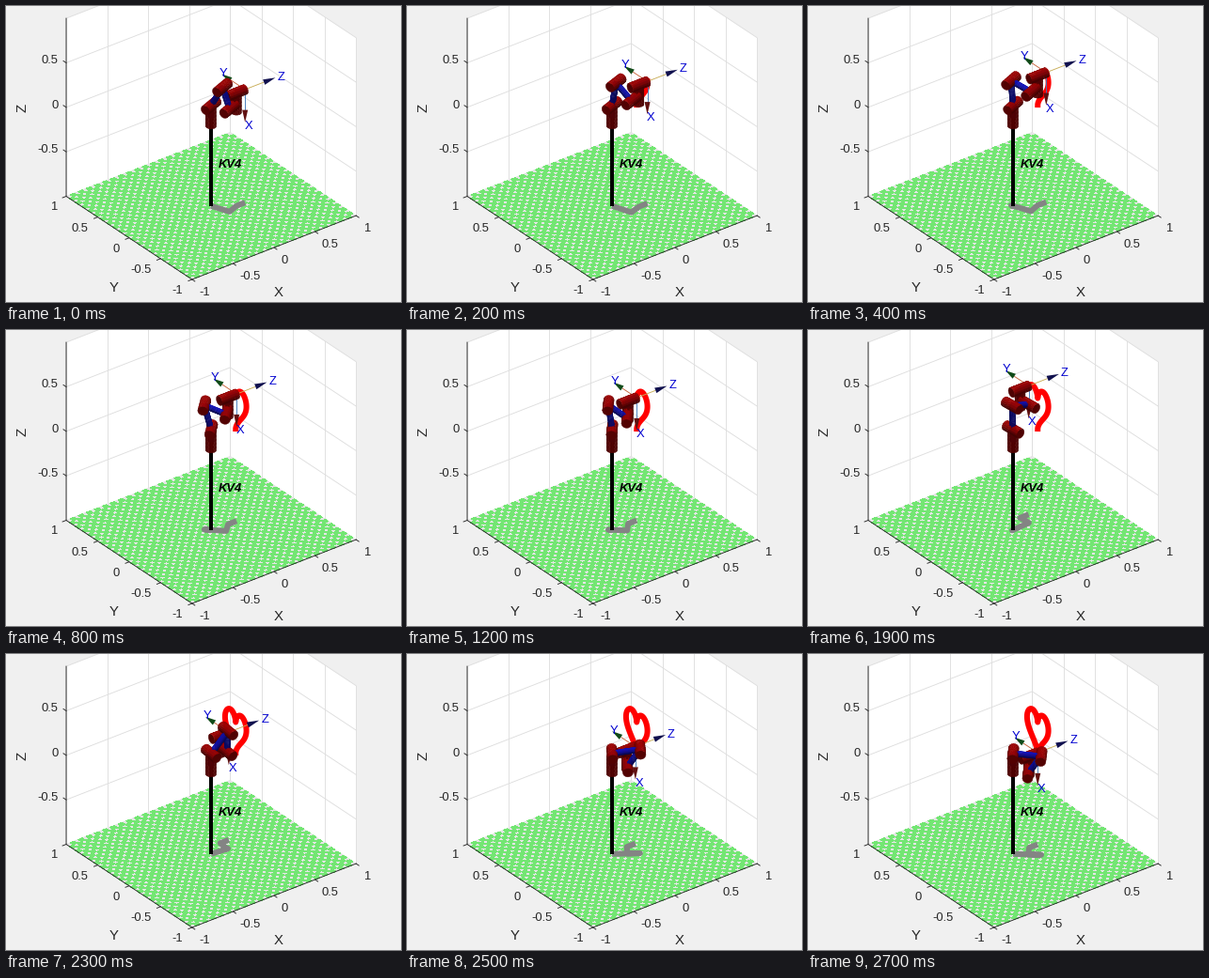
Animation of 420 by 315 pixels, one loop 2800 ms. Source, as a matplotlib script:

```python
import numpy as np
import matplotlib.pyplot as plt
from matplotlib.animation import FuncAnimation
from matplotlib.collections import LineCollection, PolyCollection

W, H, DPI = 420, 315, 100
PX = 72 / DPI
FRAMES, STEP_MS = 28, 100

# Orthographic camera
AZ, EL, SCALE = np.radians(37.5), np.radians(30.5), 109.9
RIGHT = np.array([np.cos(AZ), -np.sin(AZ), 0])
UP = np.array([np.sin(EL) * np.sin(AZ), np.sin(EL) * np.cos(AZ), np.cos(EL)])
VIEW = np.cross(RIGHT, UP)
CENTER = np.array([218.1, 118.1])

# Arm dimensions
D1, A2, A3, D4, D5, D6 = 0.1283, 0.274, 0.230, 0.1283, 0.116, 0.105
JOINT_R, JOINT_LEN, LINK_R = 0.05, 0.21, 0.028
RED, BLUE = np.array([0.7, 0.02, 0.02]), np.array([0.08, 0.08, 0.85])
LIGHT = np.array([-0.12, -0.12, 1])
LIGHT = LIGHT / np.linalg.norm(LIGHT)

XH, YH, ZH = np.eye(3)
AXIS_LEN, CONE_LEN = 0.37, 0.14


def project(p):
    p = np.asarray(p, float)
    return CENTER + SCALE * np.stack([p @ RIGHT, -(p @ UP)], axis=-1)


def unit(v):
    return v / np.linalg.norm(v)


def heart(deg):
    t = np.radians(deg)
    u = 16 * np.sin(t) ** 3
    v = 13 * np.cos(t) - 5 * np.cos(2 * t) - 2 * np.cos(3 * t) - np.cos(4 * t)
    return np.stack([np.full_like(t, 0.3), -0.0106 * u, 0.03 + 0.0156 * (v + 17)], axis=-1)


def heart_angle(i):
    return np.interp(i, [0, 4, 8, 12, 19, 23, 27], [107, 68, 26, -7, -71, -120, -180])


def solve_arm(tool):
    """Skeleton points and the joint axis normal for a tool facing +x."""
    wrist = tool - D6 * XH
    r = np.sqrt(wrist[0] ** 2 + wrist[1] ** 2 - D4 ** 2)
    yaw = np.arctan2(wrist[1], wrist[0]) - np.arctan2(D4, r)
    heading = np.array([np.cos(yaw), np.sin(yaw), 0])
    normal = np.array([-np.sin(yaw), np.cos(yaw), 0])
    dz = wrist[2] - D5 - D1
    dist = np.hypot(r, dz)
    bend = np.arccos(np.clip((dist ** 2 + A2 ** 2 - A3 ** 2) / (2 * dist * A2), -1, 1))
    pitch = np.arctan2(dz, r) + bend
    base = np.zeros(3)
    shoulder = D1 * ZH
    elbow = shoulder + A2 * (np.cos(pitch) * heading + np.sin(pitch) * ZH)
    mid = shoulder + r * heading + dz * ZH
    return [base, shoulder, elbow, mid, mid + D4 * normal, wrist, tool], normal


def shade(color, n):
    return color * (0.38 + 0.5 * max(0, n @ LIGHT))


def cylinder(a, b, radius, color, sides=16, parts=5):
    """Visible facets as (depth, polygon, color)."""
    axis = unit(b - a)
    side = unit(np.cross(axis, XH if abs(axis[0]) < 0.8 else YH))
    other = np.cross(axis, side)
    ang = np.linspace(0, 2 * np.pi, sides + 1)
    ring = np.cos(ang)[:, None] * side + np.sin(ang)[:, None] * other
    facets = []
    for k in range(sides):
        n = unit(ring[k] + ring[k + 1])
        if n @ VIEW <= 0:
            continue
        tone = shade(color, n)
        for j in range(parts):
            p, q = a + (b - a) * j / parts, a + (b - a) * (j + 1) / parts
            quad = np.array([p + radius * ring[k], q + radius * ring[k],
                             q + radius * ring[k + 1], p + radius * ring[k + 1]])
            facets.append((quad.mean(0) @ VIEW, project(quad), tone))
    end, n = (b, axis) if axis @ VIEW > 0 else (a, -axis)
    facets.append((end @ VIEW, project(end + radius * ring[:-1]), shade(color, n)))
    return facets


def arm_facets(points, normal):
    facets = []
    for a, b in zip(points, points[1:]):
        facets += cylinder(a, b, LINK_R, BLUE)
    for p, axis in zip(points, [ZH, normal, normal, normal, ZH, XH]):
        half = axis * JOINT_LEN / 2
        facets += cylinder(p - half, p + half, JOINT_R, RED)
    return sorted(facets, key=lambda f: f[0])


fig = plt.figure(figsize=(W / DPI, H / DPI), dpi=DPI, facecolor="#f0f0f0")
ax = fig.add_axes([0, 0, 1, 1])
ax.set_xlim(0, W)
ax.set_ylim(H, 0)
ax.axis("off")


def line3(points, color, width, z):
    xy = project(points)
    return ax.plot(xy[:, 0], xy[:, 1], color=color, lw=width * PX, zorder=z)[0]


def label(x, y, s, size=13, z=20, **kw):
    kw = {"ha": "center", "va": "center", "color": "#262626", **kw}
    return ax.text(x, y, s, fontsize=size * PX, family="Liberation Sans", zorder=z, **kw)


def draw_floor():
    floor = project([(-1, -1, -1), (1, -1, -1), (1, 1, -1), (-1, 1, -1)])
    ax.fill(*floor.T, color="#e6e6e6", lw=0, zorder=2)
    n = 41
    s = 2 / n
    tiles = []
    for i in range(n):
        for j in range((i + 1) % 2, n, 2):
            x, y = -1 + i * s, -1 + j * s
            tiles.append(project([(x, y, -1), (x + s, y, -1),
                                  (x + s, y + s, -1), (x, y + s, -1)]))
    ax.add_collection(PolyCollection(tiles, facecolors="#73e673", edgecolors="none",
                                     antialiaseds=False, zorder=2.1))


def draw_room():
    walls = [[(-1, 1, -1), (-1, 1, 1), (1, 1, 1), (1, 1, -1)],
             [(1, 1, -1), (1, 1, 1), (1, -1, 1), (1, -1, -1)]]
    for wall in walls:
        ax.fill(*project(wall).T, color="white", lw=0, zorder=0)
    grid = "#dedede"
    for g in np.linspace(-1, 1, 5):
        line3([(g, 1, -1), (g, 1, 1)], grid, 0.9, 1)
        line3([(1, g, -1), (1, g, 1)], grid, 0.9, 1)
        line3([(-1, 1, g), (1, 1, g), (1, -1, g)], grid, 0.9, 1)

    dark = "#262626"
    line3([(-1, 1, 1), (-1, 1, -1), (-1, -1, -1), (1, -1, -1)], dark, 0.9, 3)
    tick = 0.045
    for g in np.linspace(-1, 1, 5):
        text = f"{g:g}"
        line3([(g, -1, -1), (g, -1 - tick, -1)], dark, 0.9, 3)
        line3([(-1, g, -1), (-1 - tick, g, -1)], dark, 0.9, 3)
        x, y = project((g, -1, -1))
        label(x + 7.4, y + 14.2, text, ha="left")
        x, y = project((-1, g, -1))
        label(x - 9.8, y + 12, text, ha="right")
        if abs(g) < 1:
            line3([(-1, 1, g), (-1, 1 + tick, g)], dark, 0.9, 3)
            label(55.7, project((-1, 1, g))[1] - 2, text, ha="right")
    label(290, 305, "X", 15)
    label(115, 300, "Y", 15)
    label(17, 108, "Z", 15, rotation=90)


draw_room()
draw_floor()
shadow = line3(np.zeros((2, 3)), "#848484", 6, 4)
shadow.set_solid_capstyle("butt")
line3([(0, 0, -1), (0, 0, 0)], "black", 4, 5).set_solid_capstyle("butt")
trail = line3(np.zeros((2, 3)), "red", 6, 6)
shafts = LineCollection([], colors=["#3f78b8", "#c8643c", "#c9ae58"],
                        linewidths=0.9 * PX, zorder=7)
cones = PolyCollection([], facecolors=["#601010", "#104a18", "#10104e"],
                       edgecolors="none", zorder=8)
arm = PolyCollection([], edgecolors="face", linewidths=0.3, zorder=9)
for c in (shafts, cones, arm):
    ax.add_collection(c)
label(238, 169, "KV4", 13, color="black", weight="bold", style="italic")
axis_names = [label(0, 0, s, 13, color="#0000d0") for s in "XYZ"]
NAME_SHIFT = [(3.8, 39), (-23.2, -17), (38.2, -13)]


def cone(base, tip):
    d = unit(tip - base)
    side = np.array([-d[1], d[0]]) * 3
    return [base + side, tip, base - side]


def update(i):
    angle = heart_angle(i)
    tool = heart(np.array([angle]))[0]
    points, normal = solve_arm(tool)

    ground = np.array(points)
    ground[:, 2] = -1
    shadow.set_data(*project(ground).T)

    path = heart(np.linspace(180, angle, 90))
    trail.set_data(*project(path).T)
    trail.set_visible(i > 0)

    origin = project(tool)
    dirs = [-ZH, YH, XH]
    tips = [project(tool + AXIS_LEN * d) for d in dirs]
    bases = [project(tool + (AXIS_LEN - CONE_LEN) * d) for d in dirs]
    shafts.set_segments([[origin, b] for b in bases])
    cones.set_verts([cone(b, t) for b, t in zip(bases, tips)])
    for name, shift in zip(axis_names, NAME_SHIFT):
        name.set_position(origin + shift)

    facets = arm_facets(points, normal)
    arm.set_verts([f[1] for f in facets])
    arm.set_facecolor([tuple(f[2]) for f in facets])
    return [shadow, trail, shafts, cones, arm, *axis_names]


anim = FuncAnimation(fig, update, frames=FRAMES, interval=STEP_MS,
                     repeat=True, repeat_delay=0, blit=False)
plt.show()
```
